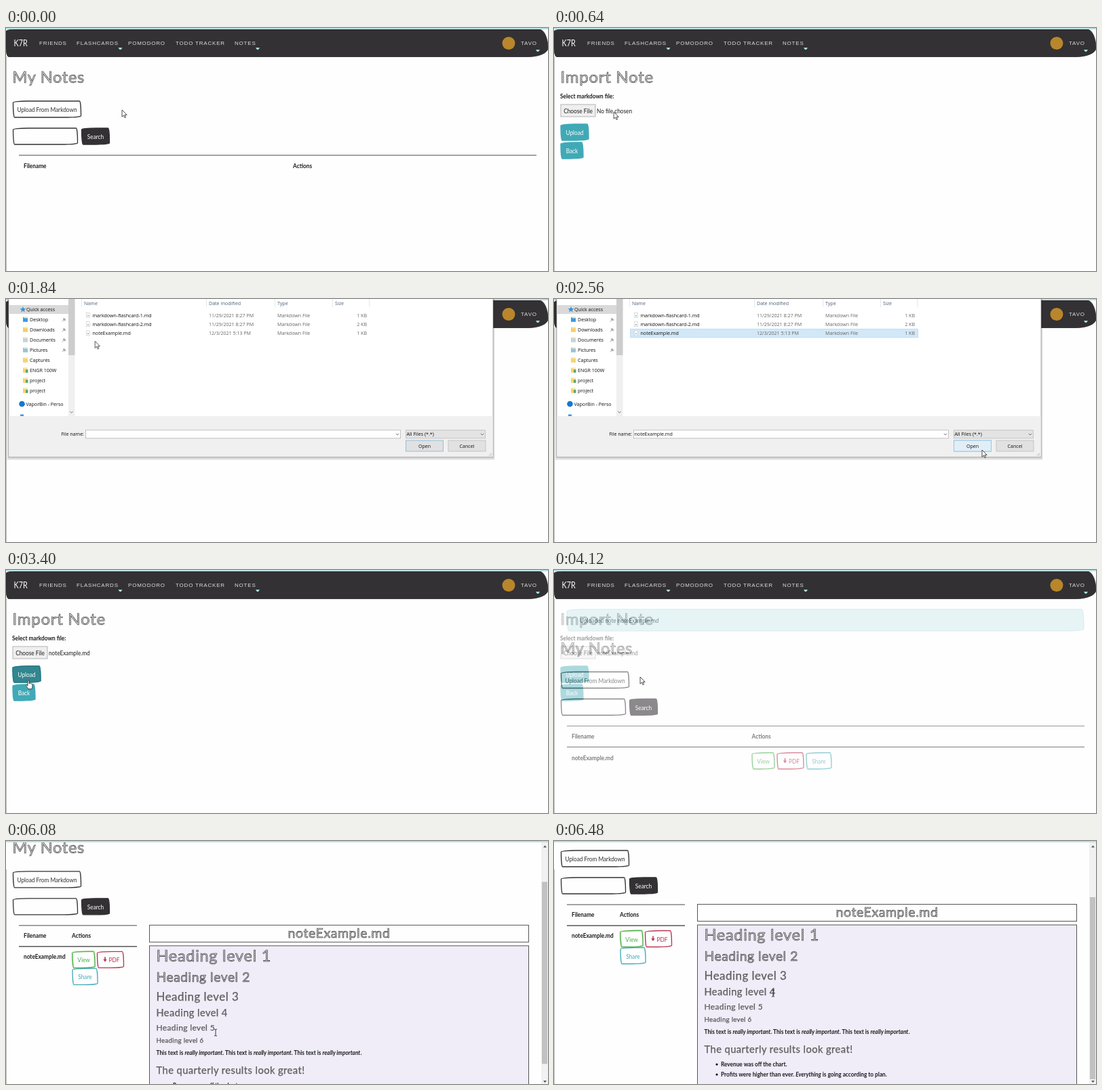
These frames come from a looping animation (799x359 px, 6.52 s). An HTML page:

```html
<!DOCTYPE html>
<html lang="en">
<head>
<meta charset="utf-8">
<title>Import a note</title>
<style>
html, body { margin: 0; width: 100%; height: 100%; overflow: hidden; background: #fefefe; }
svg { display: block; width: 799px; height: 359px; }
text { white-space: pre; }
.hand { font: 10px Lato, "Open Sans", sans-serif; }
.hand.bold { font-weight: 700; }
.head { font-family: Lato, "Open Sans", sans-serif; letter-spacing: .03em; fill: #666; stroke: #444; stroke-width: .25px; }
.head.large { fill: url(#hatch); stroke: #333; stroke-width: .6px; }
.nav { font: 8px "Liberation Sans", Arial, sans-serif; letter-spacing: .8px; fill: #dcdcdc; }
.ui { font: 7.1px "Open Sans", "Noto Sans", sans-serif; }
#dialog { transform-origin: 361px 86px; }
</style>
</head>
<body>
<svg id="stage" viewBox="0 0 799 359" xmlns="http://www.w3.org/2000/svg"></svg>
<script>
const LOOP = 6520, INK = '#333133', PAPER = '#fefefe';
const GREEN = '#4cae4c', RED = '#bd3350', TEAL = '#41a9b6';

// ---- drawing helpers ----
const rect = (x, y, w, h, fill, more = '') =>
  `<rect x="${x}" y="${y}" width="${w}" height="${h}" fill="${fill}" ${more}/>`;
const path = (d, stroke, width = 1, fill = 'none') =>
  `<path d="${d}" fill="${fill}" stroke="${stroke}" stroke-width="${width}"/>`;
const group = (id, body) => `<g id="${id}">${body}</g>`;

// Hand lettering is a condensed face
const hand = (x, y, s, { fill = '#1c1c1c', bold, mid, size = 10 } = {}) =>
  `<text class="hand${bold ? ' bold' : ''}" transform="translate(${x} ${y}) scale(.83 1)" fill="${fill}"` +
  ` style="font-size:${size}px"${mid ? ' text-anchor="middle"' : ''}>${s}</text>`;
const head = (x, y, s, size, mid) =>
  `<text class="head${size > 19 ? ' large' : ''}" x="${x}" y="${y}" font-size="${size}"` +
  `${mid ? ' text-anchor="middle"' : ''}>${s}</text>`;
const ui = (x, y, s, fill = '#111', anchor = 'start') =>
  `<text class="ui" x="${x}" y="${y}" fill="${fill}" text-anchor="${anchor}">${s}</text>`;

// Box with elliptical corners: top left, top right, bottom right, bottom left
function outline(x, y, w, h, [a, b, c, d]) {
  const r = x + w, l = y + h;
  return `M${x + a[0]} ${y}H${r - b[0]}A${b} 0 0 1 ${r} ${y + b[1]}V${l - c[1]}A${c} 0 0 1 ${r - c[0]} ${l}` +
    `H${x + d[0]}A${d} 0 0 1 ${x} ${l - d[1]}V${y + a[1]}A${a} 0 0 1 ${x + a[0]} ${y}Z`;
}
function sketch(x, y, w, h, stroke, fill = 'none', width = 1.3) {
  const f = Math.min(w, h) / 280;
  const corners = [[255, 25], [25, 225], [225, 25], [25, 255]].map(p => p.map(v => v * f));
  return path(outline(x, y, w, h, corners), stroke, width, fill);
}
const button = (x, y, w, label, stroke, fill = PAPER, color = stroke) =>
  sketch(x, y, w, 24, stroke, fill) + hand(x + w / 2, y + 16, label, { fill: color, mid: true });

// ---- page parts ----
const caret = (x, y) => `<path d="M${x - 3} ${y - 1.5}h6l-2 3h-2z" fill="#a5dcdd"/>`;
function nav(w) {
  const links = [[49, 'FRIENDS'], [104, 'FLASHCARDS'], [180, 'POMODORO'], [250, 'TODO TRACKER'],
    [337, 'NOTES'], [w - 40, 'TAVO']];
  return path(outline(0, 2, w, 40.5, [[13, 3], [13, 28], [29, 13], [4, 13]]), '#222', .8, INK) +
    hand(11.5, 26.5, 'K7R', { fill: '#fff', size: 13 }) +
    links.map(([x, s]) => `<text class="nav" x="${x}" y="25.3">${s}</text>`).join('') +
    caret(168.5, 30.5) + caret(371, 30.5) + caret(w - 15, 33.5) +
    `<circle cx="${w - 58}" cy="22.5" r="9.5" fill="#b9862b"/>`;
}
const page = (id, body, w = 799) => group(id, rect(0, 0, 799, 470, PAPER) + nav(w) + body);
const tools = dy => `<g transform="translate(0 ${dy})">` + head(9.5, 81, 'My Notes', 23.5) +
  button(10.5, 108, 100, 'Upload From Markdown', INK) + sketch(10.5, 148, 95, 24, INK) +
  button(111.5, 148, 41, 'Search', INK, INK, '#fff') + '</g>';
const line = (x, y, w, t = 1) => rect(x, y - t / 2, w, t, '#4a4a4a');
const columns = (y, x2) => hand(26, y, 'Filename', { bold: true }) + hand(x2, y, 'Actions', { bold: true });
const pdf = (x, y) => button(x, y, 39, '', RED) +
  path(`M${x + 11.5} ${y + 8}v5`, RED, 1.6) +
  `<path d="M${x + 8.8} ${y + 11.5}h5.4l-2.7 4z" fill="${RED}"/>` +
  hand(x + 17, y + 16, 'PDF', { fill: RED });

const empty = page('empty', tools(0) + line(19, 188, 763) + columns(206.5, 423) +
  group('uploadHover', button(10.5, 108, 100, 'Upload From Markdown', INK, INK, '#fff')));

const choose = fill => rect(10, 113, 51, 18, fill, 'stroke="#a3a3a3" stroke-width=".8"') +
  hand(35.5, 125.5, 'Choose File', { mid: true });
const upload = page('import', head(9.5, 81, 'Import Note', 24) +
  hand(9, 103.5, 'Select markdown file:', { bold: true }) +
  choose('#efefef') + group('chooseHover', choose('#e2e2e2')) +
  group('noFile', hand(63, 125.5, 'No file chosen')) + group('hasFile', hand(63, 125.5, 'noteExample.md')) +
  button(10, 142, 41, 'Upload', TEAL, TEAL, '#fff') +
  group('sendHover', button(10, 142, 41, 'Upload', '#2a7781', '#31868f', '#fff')) +
  button(10, 169, 33, 'Back', TEAL, TEAL, '#fff'));

const listed = page('listed', sketch(19, 58, 762, 32, '#b4dde1', '#d5ecef', 1) +
  hand(38, 77.5, 'Uploaded note noteExample.md', { fill: '#123b42' }) + tools(42.5) +
  line(19, 230.5, 763) + columns(249, 291.5) + line(19, 261.5, 763, 1.4) +
  hand(26, 280.5, 'noteExample.md', { bold: true }) +
  button(292, 270, 33, 'View', GREEN) + pdf(329, 270) + button(372, 270, 37, 'Share', TEAL) +
  group('viewHover', sketch(291, 268.5, 35, 27, '#b9dfb4', 'none', 2) +
    button(292, 270, 33, 'View', '#3f9f40', GREEN, '#fff')));

// Note preview, in document coordinates
const really = 'This text is <tspan font-style="italic">really important</tspan>. ';
const levels = [[241, 23.5], [271, 19.2], [299, 16.9], [322, 14.6], [343, 12], [361, 9.7]];
const viewed = page('viewed', tools(0) + line(19, 188, 174) + columns(206, 97) + line(19, 219, 174, 1.4) +
  hand(26, 237.3, 'noteExample.md', { bold: true }) +
  sketch(97, 225.5, 34.5, 26, '#d9ecc0', 'none', 1.6) + button(98, 226.5, 33, 'View', GREEN) +
  pdf(134.5, 226.5) + button(98, 251.5, 37, 'Share', TEAL) +
  rect(211.5, 187.5, 559, 25, PAPER, 'stroke="#555"') + head(491, 206, 'noteExample.md', 19.5, true) +
  rect(211.5, 218, 559, 260, '#f0edf9', 'stroke="#555"') +
  levels.map(([y, size], i) => head(221.5, y, 'Heading level ' + (i + 1), size)).join('') +
  hand(221.5, 378.7, really.repeat(3).trim(), { bold: true }) +
  head(221.5, 407, 'The quarterly results look great!', 14.7) +
  '<circle cx="240" cy="424" r="1.6"/><circle cx="240" cy="439" r="1.6"/>' +
  hand(246, 426.7, 'Revenue was off the chart.', { bold: true }) +
  hand(246, 441.7, 'Profits were higher than ever. <tspan font-style="italic">Everything</tspan> is going according to plan.',
    { bold: true }),
  789);
const scrollbar = group('bar', rect(789, 2, 10, 357, '#f1f1f1') +
  '<path d="M792 9.5l2.5-3 2.5 3zM792 354l2.5 3 2.5-3z" fill="#555"/>' +
  group('thumb', rect(790, 14, 8, 269, '#c1c1c1')));

// ---- file dialog ----
const chevron = (x, y) => path(`M${x - 2.2} ${y - 1}l2.2 2.2 2.2-2.2`, '#555', .8);
const folder = (x, y, c = '#f6d36b') => rect(x, y - 3.5, 7, 7, c) + rect(x + 1.5, y - 4, 5.5, 2, '#fbe9a9');
const pin = y => path(`M83 ${y + 3}l2-2m-1-2l3 3m-2-4l3 3m-2-3l-1 2 1 1 2-1`, '#7c868e', .9);
const places = ['Desktop', 'Downloads', 'Documents', 'Pictures', 'Captures', 'ENGR 100W', 'project', 'project'];
const files = [['markdown-flashcard-1.md', '11/29/2021 8:27 PM', 1], ['markdown-flashcard-2.md', '11/29/2021 8:27 PM', 2],
  ['noteExample.md', '12/3/2021 5:13 PM', 1]];

const sidebar = rect(4, 9, 88, 13, '#d9d9d9') +
  '<path d="M25 11l1.2 3 3.3.2-2.6 2 .9 3.3-2.8-1.9-2.8 1.9.9-3.3-2.6-2 3.3-.2z" fill="#3a91d6"/>' +
  ui(30, 18, 'Quick access') +
  places.map((s, i) => {
    const y = 30.3 + 15 * i;
    return folder(25, y, i < 4 ? ['#3b9ae0', '#f3cf67', '#c3d3dc', '#8fc4e6'][i] : undefined) +
      (i > 4 ? rect(29, y - 1, 3.5, 4.5, '#5aa578') : '') + ui(35, y + 2.5, s) + (i < 4 ? pin(y) : '');
  }).join('') +
  '<circle cx="23.5" cy="155" r="4.3" fill="#1678cf"/>' + ui(29.5, 157.6, 'VaporBin - Perso') +
  rect(21, 170.5, 5, 2.5, '#3b9ae0') +
  rect(92, -60, 9.5, 233, '#f0f0f0') + rect(92, -20, 9.5, 103, '#cdcdcd') + chevron(96.5, 167);

const list = [['Name', 115], ['Date modified', 299], ['Type', 400], ['Size', 485]]
  .map(([s, x]) => ui(x, 8.5, s, '#4b6079')).join('') +
  [111, 295, 396, 481, 535].map(x => rect(x, 0, .8, 12, '#e3e3e3')).join('') +
  group('picked', rect(112.5, 44.3, 424, 12.6, '#d2e8f8', 'stroke="#b4d9f2" stroke-width=".8"')) +
  files.map(([name, date, kb], i) => {
    const y = 27 + 13.2 * i, grey = '#666';
    return rect(118.5, y - 6.5, 5, 7, '#fff', 'stroke="#c4c4c4" stroke-width=".6"') + rect(120, y - 3, 2, 1.5, '#8aa9bf') +
      ui(127.5, y, name) + ui(299, y, date, grey) + ui(400, y, 'Markdown File', grey) + ui(532, y, kb + ' KB', grey, 'end');
  }).join('');

const key = (x, label, fill, stroke) =>
  rect(x, 209, 55, 16, fill, `stroke="${stroke}" stroke-width=".8"`) + ui(x + 27.5, 219.7, label, '#111', 'middle');
const dialog = group('dialog',
  [5, 3.5, 2].map(s => rect(4 - s / 2, -61, 714 + s, 294 + s, '#000', 'opacity=".07"')).join('') +
  rect(4, -61, 714, 294, '#fff', 'stroke="#9a9a9a" stroke-width=".7"') + sidebar + list +
  rect(4.4, 173, 713.2, 59.7, '#f0f0f0') + ui(115, 202.3, 'File name:', '#111', 'end') +
  rect(117.5, 193.8, 464, 12, '#fff', 'stroke="#b5b5b5" stroke-width=".8"') + chevron(577, 199.8) +
  group('typed', ui(118.5, 202.3, 'noteExample.md')) +
  rect(589.5, 193.8, 117, 12, '#e3e3e3', 'stroke="#bcbcbc" stroke-width=".8"') +
  ui(590.5, 202.3, 'All Files (*.*)') + chevron(702, 199.8) +
  key(589.5, 'Open', '#e1e1e1', '#7fb4da') + group('openHover', key(589.5, 'Open', '#e2eef6', '#8dc2e6')) +
  key(652, 'Cancel', '#e1e1e1', '#bcbcbc') +
  path('M712 231.5l4-4M714.5 231.5l1.5-1.5', '#aaa', .8));

// ---- chrome and pointer ----
const status = (id, w, s) => group(id,
  `<path d="M0 349.5H${w - 2}q2 0 2 2V359H0z" fill="#7fcfcd"/>` +
  `<text class="ui" x="3" y="358.3" fill="#2c6b6c" style="font-size:6.8px">${s}</text>`);
const chrome = rect(0, 0, 799, 2, '#b9e1e2') + rect(0, 42, .9, 317, '#b5b5b5');
const pointer = group('pointer',
  group('arrow', path('M0 0V10.2L2.4 8 4 11.6 5.6 10.9 4 7.4H7.2Z', '#222', .8, '#fff')) +
  group('finger', path('M-1 1q0-1.2 1-1.2t1 1.2v3.6q1-.6 1.7.2 1.1-.5 1.7.4 1.5-.2 1.5 1.2v3q0 1.6-1 3.4h-5' +
    'q-1.3-2.4-3.2-4.4-.4-1.3.7-1.3.7 0 1.6 1.1z', '#222', .8, '#fff')) +
  group('beam', path('M-2-5q2 0 2 1v8q0 1-2 1M2-5q-2 0-2 1m0 8q0 1 2 1', '#222', .9)));

document.getElementById('stage').innerHTML =
  `<defs><pattern id="hatch" width="1.9" height="1.9" patternUnits="userSpaceOnUse" patternTransform="rotate(35)">
    <rect width=".8" height="1.9" fill="#777"/></pattern></defs>` +
  empty + upload + listed + viewed + scrollbar + chrome +
  status('importLink', 96, 'localhost:5000/importNote') + status('viewLink', 96, 'localhost:5000/viewNote/1') +
  dialog + pointer;

// ---- motion ----
function play(id, prop, steps, easing = 'linear') {
  const all = [...steps];
  if (all[0][0] > 0) all.unshift([0, all[0][1]]);
  all.push([LOOP, all[all.length - 1][1]]);
  document.getElementById(id).animate(
    all.map(([t, v]) => ({ offset: t / LOOP, [prop]: v, easing })),
    { duration: LOOP, iterations: Infinity });
}
const fade = (id, ...steps) => play(id, 'opacity', steps);
// Visible from the start of each span to its end, with hard edges
function show(id, ...spans) {
  const steps = spans[0][0] > 0 ? [[0, 0]] : [];
  for (const [from, to] of spans) {
    steps.push([from, 1]);
    if (to < LOOP) steps.push([to, 0]);
  }
  play(id, 'opacity', steps, 'step-end');
}

fade('import', [520, 0], [640, 1]);
fade('listed', [4040, 0], [4080, .25], [4120, .56], [4160, 1]);
fade('viewed', [5560, 0], [5600, .35], [5640, .75], [5680, 1]);
fade('bar', [5560, 0], [5680, 1]);
play('viewed', 'transform', [[5840, 'translateY(0)'], [6240, 'translateY(-94px)']], 'ease-in-out');
play('thumb', 'transform', [[5840, 'translateY(0)'], [6240, 'translateY(69px)']], 'ease-in-out');

fade('dialog', [1400, 0], [1440, .12], [1480, .5], [1520, .85], [1560, 1], [2760, 1], [2880, 0]);
play('dialog', 'transform', [[1440, 'scale(.966)'], [1560, 'scale(1)'], [2760, 'scale(1)'], [2880, 'scale(.966)']]);

show('uploadHover', [230, 630]);
show('chooseHover', [1110, 1630]);
show('noFile', [0, 2790]);
show('hasFile', [2790, LOOP]);
show('picked', [2030, 2890]);
show('typed', [2030, 2890]);
show('openHover', [2430, 2890]);
show('sendHover', [3230, 3670]);
show('viewHover', [4830, 5690]);
fade('importLink', [240, 0], [360, 1], [520, 1], [640, 0]);
fade('viewLink', [4920, 0], [5040, 1], [5560, 1], [5640, 0]);

const route = [[0, 171, 121], [360, 92, 121], [680, 88, 124], [1240, 48, 121], [1560, 48, 121], [1960, 150, 49],
  [2120, 152, 49], [2520, 631, 223], [2800, 631, 223], [3320, 33, 163], [3600, 33, 163], [4080, 127, 158],
  [4300, 127, 158], [4940, 309, 283], [6320, 309, 283], [6460, 323, 225]];
play('pointer', 'transform', route.map(([t, x, y]) => [t, `translate(${x}px, ${y}px)`]), 'ease-in-out');
show('arrow', [0, 230], [630, 1110], [1550, 3230], [3670, 4830]);
show('finger', [230, 630], [1110, 1550], [3230, 3670], [4830, 5670]);
show('beam', [5670, LOOP]);
</script>
</body>
</html>
```
